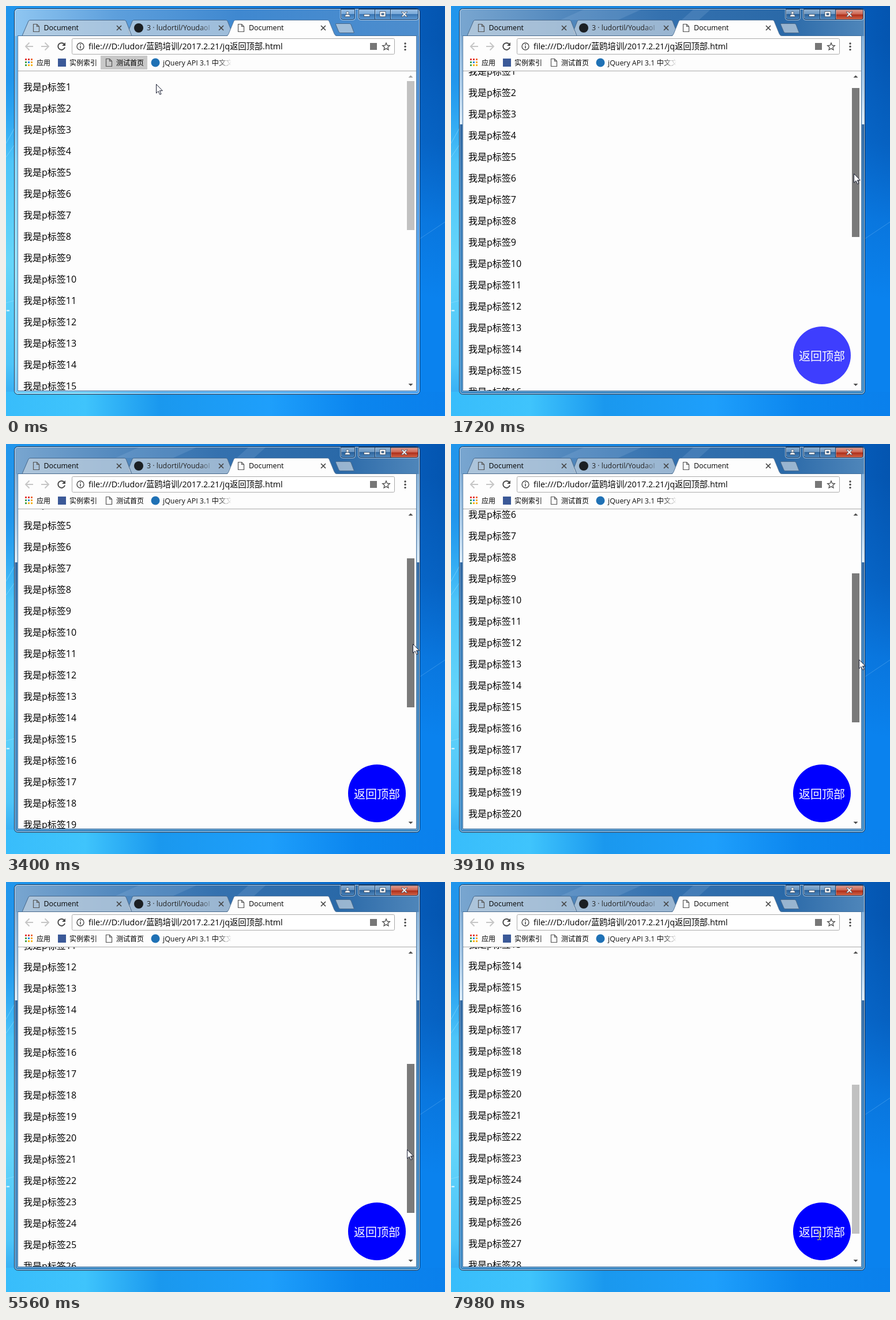
An HTML page that plays this animation: 761 px wide and 710 px high, repeating every 8000 ms.

```html
<!DOCTYPE html>
<html lang="zh-CN">
<head>
<meta charset="utf-8">
<title>返回顶部</title>
<style>
html, body { margin: 0; width: 100%; height: 100%; overflow: hidden; background: #1680dc; }
svg { display: block; width: 761px; height: 710px; }
text { font-family: "Open Sans", "Noto Sans CJK SC", "Noto Sans CJK", sans-serif; fill: #000; white-space: pre; }
.small { font-size: 12.4px; }
.han { font-size: 12px; }
.url { font-size: 14.3px; }
.item { font-size: 16px; }
.line { fill: none; stroke: #4a4a4a; stroke-width: 1.6; }
#beam { mix-blend-mode: difference; }
</style>
</head>
<body>
<svg viewBox="0 0 761 710">
<defs>
  <linearGradient id="sky"><stop stop-color="#2196ec"/><stop offset=".5" stop-color="#1983dd"/><stop offset=".85" stop-color="#0862c2"/><stop offset="1" stop-color="#0455b0"/></linearGradient>
  <radialGradient id="cyan" gradientUnits="userSpaceOnUse" cx="0" cy="0" r="1" gradientTransform="translate(0 445) scale(330 320)"><stop stop-color="#66d6fa"/><stop offset=".55" stop-color="#55cdfb" stop-opacity=".85"/><stop offset="1" stop-color="#35b5fa" stop-opacity="0"/></radialGradient>
  <linearGradient id="low" gradientUnits="userSpaceOnUse" x1="761" y1="60" x2="700" y2="500"><stop stop-color="#0a78e2" stop-opacity="0"/><stop offset=".4" stop-color="#0a78e2" stop-opacity=".35"/><stop offset=".7" stop-color="#0a7ce6" stop-opacity=".85"/><stop offset="1" stop-color="#0a82ee"/></linearGradient>
  <linearGradient id="floor"><stop stop-color="#38bdfb"/><stop offset=".18" stop-color="#3fc4fc"/><stop offset=".35" stop-color="#1a98ee"/><stop offset=".6" stop-color="#1e9ffb"/><stop offset=".8" stop-color="#0b85ee"/><stop offset="1" stop-color="#0a80ec"/></linearGradient>
  <linearGradient id="side" gradientUnits="userSpaceOnUse" x1="0" y1="5" x2="0" y2="672"><stop stop-color="#5f92c4"/><stop offset=".08" stop-color="#82aed6"/><stop offset=".2" stop-color="#a9cae7"/><stop offset=".299" stop-color="#dcebf7"/><stop offset=".3" stop-color="#265f9b"/><stop offset=".5" stop-color="#3478b4"/><stop offset="1" stop-color="#3a87c2"/></linearGradient>
  <linearGradient id="cap"><stop stop-color="#79a6d0"/><stop offset=".25" stop-color="#5389be"/><stop offset=".5" stop-color="#3471af"/><stop offset=".8" stop-color="#2a69a8"/><stop offset="1" stop-color="#4f86ba"/></linearGradient>
  <linearGradient id="capIdle"><stop stop-color="#8fc6f1"/><stop offset=".25" stop-color="#5d9fdc"/><stop offset=".55" stop-color="#3f88d0"/><stop offset="1" stop-color="#4d8dcd"/></linearGradient>
  <linearGradient id="glass" x1="0" y1="0" x2="0" y2="1"><stop stop-color="#fff" stop-opacity=".45"/><stop offset=".48" stop-color="#fff" stop-opacity=".25"/><stop offset=".5" stop-color="#123d70" stop-opacity=".3"/><stop offset="1" stop-color="#8fc0ea" stop-opacity=".3"/></linearGradient>
  <linearGradient id="red" x1="0" y1="0" x2="0" y2="1"><stop stop-color="#e3a193"/><stop offset=".48" stop-color="#cb6350"/><stop offset=".5" stop-color="#ab2a16"/><stop offset="1" stop-color="#d3694c"/></linearGradient>
  <linearGradient id="fadeTab" gradientUnits="userSpaceOnUse" x1="335" x2="361" y1="0" y2="0"><stop stop-color="#222"/><stop offset="1" stop-color="#222" stop-opacity="0"/></linearGradient>
  <linearGradient id="fadeMark" gradientUnits="userSpaceOnUse" x1="366" x2="391" y1="0" y2="0"><stop stop-color="#111"/><stop offset="1" stop-color="#111" stop-opacity="0"/></linearGradient>
  <clipPath id="view"><rect x="21" y="113" width="690" height="553"/></clipPath>
  <clipPath id="tail"><rect x="0" y="80" width="390" height="30"/></clipPath>
  <rect id="frame" x="14.5" y="4.5" width="703" height="668" rx="6"/>
  <path id="caption" d="M15 52V11Q15 5 21 5H711Q717 5 717 11V52Z"/>
  <path id="doc" d="M.5 .5H6.5L10.5 4.5V13.5H.5ZM6.5 .5V4.5H10.5" fill="none" stroke="#555" stroke-width="1.2"/>
  <path id="x" d="M-4 -4L4 4M4 -4L-4 4" stroke="#444" stroke-width="1.7"/>
</defs>

<!-- desktop -->
<rect width="761" height="710" fill="url(#sky)"/>
<rect x="330" width="431" height="710" fill="url(#low)"/>
<rect y="100" width="400" height="610" fill="url(#cyan)"/>
<rect y="668" width="761" height="42" fill="url(#floor)"/>
<g stroke="#9ce2ff" fill="none">
  <path d="M0 238L15 211M0 262L15 240" opacity=".5"/>
  <path d="M716 404L761 374" stroke="#3f9aea" opacity=".8"/>
  <path d="M0 514L15 510" opacity=".5"/>
  <path d="M1 527.5H6" stroke="#e6f8ff" stroke-width="2"/>
</g>

<!-- window frame -->
<g id="idle">
  <use href="#frame" fill="#fff" fill-opacity=".26"/>
  <use href="#caption" fill="url(#capIdle)"/>
</g>
<g id="active">
  <use href="#frame" fill="url(#side)"/>
  <use href="#caption" fill="url(#cap)"/>
  <path d="M230 6H330L290 24H190ZM420 6H450L430 24H400Z" fill="#b8d6ee" opacity=".14"/>
</g>
<use href="#frame" fill="none" stroke="#17304f"/>
<rect x="15.5" y="5.5" width="701" height="666" rx="5" fill="none" stroke="#e4f2ff" stroke-opacity=".7"/>
<path d="M19.5 52V667.5H712.5V52" fill="none" stroke="#d5eaff" stroke-opacity=".4"/>
<rect x="20.5" y="51.5" width="691" height="615" fill="#fdfdfd" stroke="#3d6d9c"/>

<!-- caption buttons -->
<g stroke="#1d3f66">
  <path d="M580.5 5.5H604.5V20Q604.5 23.5 601 23.5H584Q580.5 23.5 580.5 20Z" fill="url(#glass)"/>
  <path d="M611.5 5.5H714.5V20Q714.5 23.5 711 23.5H615Q611.5 23.5 611.5 20Z" fill="url(#glass)"/>
  <path id="close" d="M667 6H714.5V20Q714.5 23.5 711 23.5H667Z" fill="url(#red)"/>
  <path d="M639.5 6V23M666.5 6V23"/>
</g>
<g fill="none" stroke="#fff" stroke-opacity=".55">
  <path d="M579.5 6V21Q580 24.5 584 24.5H601Q605 24.5 605.5 21V6M610.5 6V21Q611 24.5 615 24.5H711Q715 24.5 715.5 21V6"/>
  <path d="M581.5 7V21M612.5 7V21M640.5 7V22M667.5 7V22" stroke-opacity=".4"/>
</g>
<g fill="#fff" stroke="#3a4a5e" stroke-width=".8">
  <circle cx="592" cy="12" r="2.3"/><path d="M587.5 18.5Q587.5 14.5 592 14.5T596.5 18.5Z"/>
  <rect x="620.5" y="14.5" width="10" height="3.5"/>
  <path fill-rule="evenodd" d="M648 9.5H658V18.5H648ZM651 12.5V15.5H655V12.5Z"/>
  <path d="M685 10H688.2L690.5 12.4L692.8 10H696L692.2 14.2L696 18.4H692.8L690.5 16L688.2 18.4H685L688.8 14.2Z"/>
</g>

<!-- tabs -->
<g fill="#c3d1df" fill-opacity=".72" stroke="#48698c">
  <path d="M212 44L219 26Q220 24.5 222 24.5H381Q383 24.5 384 26L394 51.5H216Z"/>
  <path d="M28 51.5L39 26Q40 24.5 42 24.5H205Q207 24.5 208 26L218 51.5Z"/>
  <path d="M573 30.5H595Q597 30.5 598 32L603.5 46.5H580Q578 46.5 577 45L571.5 32Q571 30.5 573 30.5Z"/>
</g>
<path d="M383 52.5Q385 51 386 48L395 26Q396 24.5 398 24.5H557Q559 24.5 560 26L569 48Q570 51 573 52.5Z" fill="#fdfdfd"/>
<path d="M382 51.5Q385 51 386 48L395 26Q396 24.5 398 24.5H557Q559 24.5 560 26L569 48Q570 51 574 51.5" fill="none" stroke="#5c7c9e"/>
<use href="#doc" x="47" y="31"/><use href="#doc" x="402" y="31"/>
<circle cx="230" cy="38" r="8" fill="#1b1f23"/>
<use href="#x" x="196" y="38"/><use href="#x" x="373" y="38"/><use href="#x" x="550" y="38"/>
<text class="small" x="65.5" y="42">Document</text>
<text class="small" x="244" y="42" style="fill:url(#fadeTab)">3 · ludortil/YoudaoI</text>
<text class="small" x="421" y="42">Document</text>

<!-- toolbar -->
<g class="line">
  <path d="M47 70H34.5M40.5 63.5L34 70L40.5 76.5M61 70H73.5M67.5 63.5L74 70L67.5 76.5" stroke="#c6c6c6" stroke-width="1.9"/>
  <path d="M100.8 66A6 6 0 1 0 102 71.5" stroke-width="2"/>
  <rect x="114.5" y="56.5" width="559" height="27" rx="2" fill="#fff" stroke="#aaa" stroke-width="1"/>
  <circle cx="129" cy="70" r="6" stroke-width="1.4"/><path d="M129 69V73.5M129 66V67.7"/>
  <path d="M659 64L660.8 68.2L665.3 68.6L661.9 71.6L662.9 76L659 73.6L655.1 76L656.1 71.6L652.7 68.6L657.2 68.2Z" stroke-width="1.3"/>
</g>
<path d="M103 63V69H97Z" fill="#4a4a4a"/>
<rect x="631" y="64" width="12" height="12" fill="#777"/>
<g fill="#4a4a4a"><circle cx="692" cy="65" r="1.7"/><circle cx="692" cy="70.3" r="1.7"/><circle cx="692" cy="75.6" r="1.7"/></g>
<text class="url" x="143" y="75">file:///D:/ludor/蓝鸥培训/2017.2.21/jq返回顶部.html</text>

<!-- bookmarks -->
<rect id="hover" x="164" y="86" width="81" height="24" fill="#c8c8c8"/>
<g id="apps"></g>
<rect x="90" y="91" width="14" height="14" fill="#3b5998"/>
<use href="#doc" x="173" y="91"/>
<circle cx="259" cy="98" r="7.5" fill="#1f71b5"/>
<text class="han" x="53" y="103">应用</text>
<text class="han" x="110" y="103">实例索引</text>
<text class="han" x="191" y="103">测试首页</text>
<text class="small" x="272" y="103" clip-path="url(#tail)" style="fill:url(#fadeMark)">jQuery API 3.1 中文文</text>
<path d="M21 112.5H711" stroke="#a9a9a9"/>

<!-- page -->
<g clip-path="url(#view)">
  <g id="list"></g>
  <path id="up" d="M697.5 124L701.5 120L705.5 124Z"/>
  <path d="M697.5 654L701.5 658L705.5 654Z" fill="#505050"/>
  <rect id="thumb" x="695" width="13" height="258"/>
  <g id="top">
    <circle cx="643" cy="605" r="50" fill="#00f"/>
    <text x="603" y="613.5" font-size="20" style="fill:#fff">返回顶部</text>
  </g>
</g>
<path id="arrow" d="M.5 .5V16L4 12.6L6.7 18.3L9 17.3L6.4 11.7H11.3Z" fill="#fff" stroke="#1a1f33"/>
<path id="beam" d="M-3 -7.500H0M1 -7.500H4M.5 -7V7M-3 7.500H0M1 7.500H4" fill="none" stroke="#fff"/>
</svg>
<script>
const $ = id => document.getElementById(id);
const NS = "http://www.w3.org/2000/svg";
const LOOP = 8000, PRESS = 1210, RELEASE = 7130;

// The screen refreshes only at these moments.
const ticks = [
  0, 150, 300, 420, 540, 660, 780,
  1210, 1330, 1450, 1600, 1720, 1840, 1990, 2140,
  2290, 2410, 2560, 2680, 2800, 2950, 3100, 3250,
  3400, 3520, 3640, 3760, 3910, 4060, 4210, 4330,
  4450, 4570, 4690, 4840, 4990, 5140, 5290, 5410,
  5560, 5710, 5830, 5980, 6130, 6250,
  6530, 6680, 6830, 6980, 7130, 7280, 7410, 7560,
  7710, 7860, 7980
];

// time, pointer x, pointer y, page scroll
const track = [
  [0, 260, 135, 0], [100, 260, 135, 0], [420, 520, 200, 0], [660, 690, 265, 0],
  [780, 698, 278, 0], [1330, 698, 278, 0], [1720, 698, 290, 27], [2800, 702, 313, 79],
  [3250, 704, 338, 130], [3910, 707, 373, 203], [4330, 706, 398, 258],
  [4840, 703, 428, 326], [5410, 696, 456, 385], [6250, 693, 493, 470],
  [6680, 694, 498, 476], [7130, 694, 498, 476], [7280, 690, 535, 476],
  [7560, 650, 641, 476], [7860, 640, 617, 476], [7980, 638, 612, 476]
];

function add(parent, tag, attrs, text = "") {
  const el = document.createElementNS(NS, tag);
  for (const key in attrs) el.setAttribute(key, attrs[key]);
  el.textContent = text;
  parent.append(el);
}

for (let i = 1; i <= 30; i++) {
  add($("list"), "text", { class: "item", x: 30, y: 109 + i * 37 }, "我是p标签" + i);
}

["#e53935", "#e53935", "#ef6c3a", "#43a047", "#1e88e5", "#f5a623", "#43a047", "#f5b400", "#f5b400"]
  .forEach((fill, i) => add($("apps"), "rect",
    { x: 33 + i % 3 * 5, y: 91 + Math.floor(i / 3) * 5, width: 3, height: 3, fill }));

function sample(t) {
  const i = Math.max(1, track.findIndex(k => k[0] >= t));
  const a = track[i - 1], b = track[i];
  const p = (t - a[0]) / (b[0] - a[0]);
  return [1, 2, 3].map(n => Math.round(a[n] + (b[n] - a[n]) * p));
}

function thumbColor(t) {
  if (t < 660 || t > RELEASE) return "#c1c1c1";
  return t < PRESS || t === RELEASE ? "#a8a8a8" : "#7a7a7a";
}

function show(id, on) {
  $(id).style.display = on ? "" : "none";
}

function draw(t) {
  const [x, y, scroll] = sample(t);
  const fade = Math.min(1, Math.max(0, (t - 1453) / 400));
  const overText = t >= 7860;

  $("list").setAttribute("transform", `translate(0 ${-scroll})`);
  $("thumb").setAttribute("y", Math.floor(130 + scroll * 0.4645));
  $("thumb").setAttribute("fill", thumbColor(t));
  $("up").setAttribute("fill", scroll ? "#505050" : "#a3a3a3");
  $("top").setAttribute("opacity", 0.5 - Math.cos(fade * Math.PI) / 2);
  for (const id of ["arrow", "beam"]) $(id).setAttribute("transform", `translate(${x} ${y})`);

  show("arrow", !overText);
  show("beam", overText);
  show("hover", t < 150);
  show("idle", t < PRESS);
  show("active", t >= PRESS);
  show("close", t >= PRESS);
}

const start = performance.now();
let last = -1;
function loop() {
  const now = (performance.now() - start) % LOOP;
  const tick = ticks.findLast(t => t <= now);
  if (tick !== last) draw(last = tick);
  requestAnimationFrame(loop);
}
loop();
</script>
</body>
</html>
```
